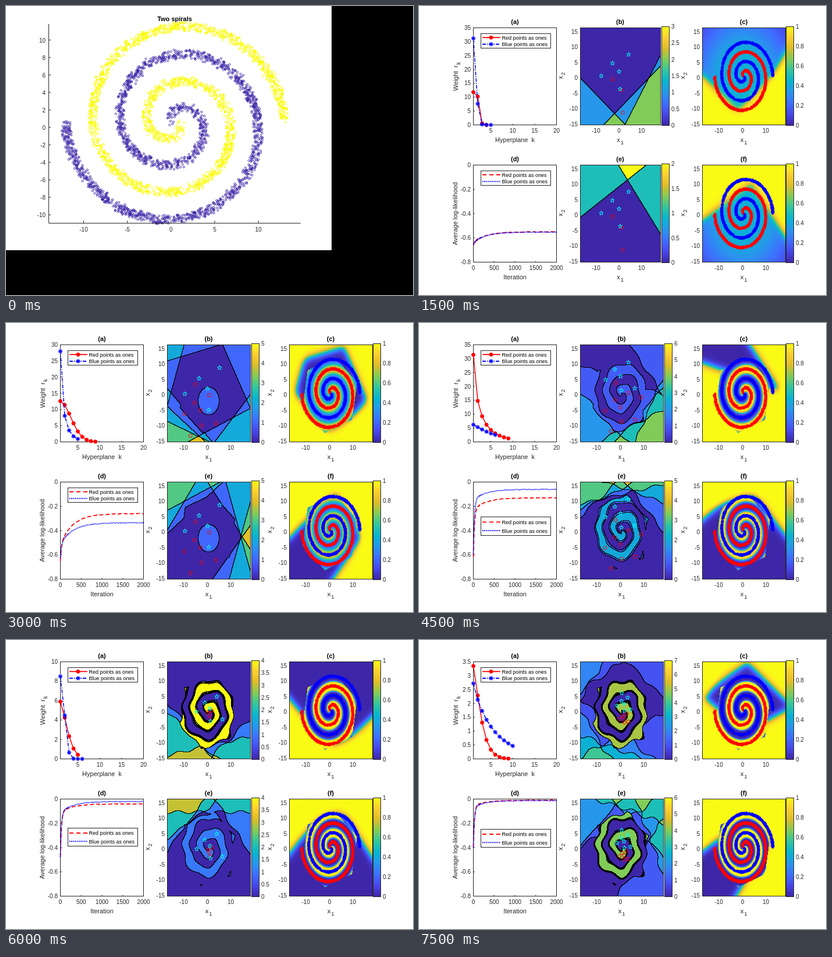
Animation, 700 px wide and 497 px high, one loop 8000 ms. Source, as an HTML page with a canvas:

```html
<!DOCTYPE html>
<html lang="en">
<head>
<meta charset="utf-8">
<title>Two spirals</title>
<style>
html, body { margin: 0; width: 100%; height: 100%; overflow: hidden; background: #fff; }
canvas { display: block; }
</style>
</head>
<body>
<canvas id="stage" width="700" height="497"></canvas>
<script>
const ctx = document.getElementById('stage').getContext('2d');
const FONT = '"Liberation Sans", Arial, sans-serif';
const INK = '#262626', RED = '#f00', BLUE = '#00f';
const W = 143, H = 167;

// Map between data units and panel pixels
const px = x => 69.5 + 4 * x, py = y => 85.5 - 5.3 * y;
const dataX = i => (i - 69.5) / 4, dataY = j => (85.5 - j) / 5.3;
const radians = degrees => degrees * Math.PI / 180;

const STOPS = ['3e26a8', '4747eb', '3e6fff', '2797eb', '08b5d0', '31c69f', '81cc59', 'dcbd29', 'fccf30', 'f9fb15']
  .map(hex => [0, 2, 4].map(i => parseInt(hex.slice(i, i + 2), 16)));
function rgb(v) {
  const p = Math.max(0, Math.min(1, v)) * 9, i = Math.min(8, Math.floor(p));
  return STOPS[i].map((c, k) => Math.round(c + (STOPS[i + 1][k] - c) * (p - i)));
}

function seeded(seed) {
  return () => (seed = (seed * 16807) % 2147483647) / 2147483647;
}

function text(s, x, y, { size = 10, align = 'center', bold = false, fill = INK } = {}) {
  ctx.font = `${bold ? 'bold ' : ''}${size}px ${FONT}`;
  ctx.textAlign = align;
  ctx.fillStyle = fill;
  ctx.fillText(s, x, y);
}
const title = (s, x, y) => text(s, x, y, { size: 11, bold: true, fill: '#000' });

// Axis label with an optional subscript; vertical ones read upwards
function label(s, sub, x, y, vertical) {
  ctx.save();
  ctx.translate(x, y);
  if (vertical) ctx.rotate(-Math.PI / 2);
  text(s, sub ? -3 : 0, 0, { size: 11 });
  const half = ctx.measureText(s).width / 2;
  if (sub) text(sub, half - 2, 4, { size: 9.5, align: 'left' });
  ctx.restore();
}

function line(points, stroke, width = 1, dash = []) {
  ctx.save();
  ctx.beginPath();
  points.forEach(([x, y]) => ctx.lineTo(x, y));
  ctx.strokeStyle = stroke;
  ctx.lineWidth = width;
  ctx.setLineDash(dash);
  ctx.stroke();
  ctx.restore();
}

function box(x, y, w, h, fill) {
  if (fill) { ctx.fillStyle = fill; ctx.fillRect(x, y, w, h); }
  ctx.strokeStyle = INK;
  ctx.lineWidth = 1;
  ctx.strokeRect(x, y, w, h);
}

function ring(x, y, r, stroke, width = 1, fill = 'transparent') {
  ctx.beginPath();
  ctx.arc(x, y, r, 0, 7);
  ctx.fillStyle = fill;
  ctx.fill();
  ctx.strokeStyle = stroke;
  ctx.lineWidth = width;
  ctx.stroke();
}

function asterisk(x, y, r, stroke, width = 1) {
  for (let a = 0; a < 180; a += 45) {
    const dx = r * Math.cos(radians(a)), dy = r * Math.sin(radians(a));
    line([[x - dx, y - dy], [x + dx, y + dy]], stroke, width);
  }
}

function star(x, y) {
  const points = Array.from({ length: 12 }, (_, i) => {
    const r = i % 2 ? 1.6 : 3.8, a = radians(36 * i);
    return [x + r * Math.sin(a), y - r * Math.cos(a)];
  });
  line(points, '#0ff');
}

// One arm of the data set; sign -1 gives the arm turned by half a circle
function spiralPoints(sign, count, noise, seed, draw) {
  const rand = seeded(seed), jitter = () => 0.5 + (rand() - 0.5) * noise;
  for (let i = 0; i < count; i++) {
    const n = Math.sqrt(rand()) * 4 * Math.PI;
    draw(sign * n * Math.cos(n) + jitter(), -sign * n * Math.sin(n) + jitter());
  }
}

function drawIntro() {
  ctx.fillStyle = '#000';
  ctx.fillRect(0, 0, 700, 497);
  ctx.fillStyle = '#fff';
  ctx.fillRect(0, 0, 560, 420);
  const ax = x => 283.8 + 15.03 * x, ay = y => 208.8 - 15.03 * y;
  spiralPoints(-1, 1900, 1, 77, (x, y) => ring(ax(x), ay(y), 1.6, '#3e26a8', 0.9));
  spiralPoints(1, 1900, 1, 4242, (x, y) => ring(ax(x), ay(y), 1.6, '#fbfb08', 0.9));
  line([[73.5, 31], [73.5, 373.5], [506.5, 373.5]], INK);
  for (let x = -10; x <= 10; x += 5) {
    line([[ax(x), 373], [ax(x), 369]], INK);
    text(x, ax(x), 388);
  }
  for (let y = -10; y <= 10; y += 2) {
    line([[73, ay(y)], [77, ay(y)]], INK);
    text(y, 68, ay(y) + 4, { align: 'right' });
  }
  title('Two spirals', 290, 26);
}

// Signed distances to the hyperplanes, each given as [normal angle, offset]
const distances = (planes, x, y) =>
  planes.map(([a, d]) => x * Math.cos(radians(a)) + y * Math.sin(radians(a)) - d);

const insideHexagon = (x, y) =>
  [-10, 50, 110].every(a => Math.abs(x * Math.cos(radians(a)) + y * Math.sin(radians(a))) < 10.8);

// Soft membership of the arm with the given sign
function armField(sign, gain, x, y) {
  x -= 0.5; y -= 0.5;
  return 1 / (1 + Math.exp(-sign * gain * Math.cos(Math.atan2(y, x) + Math.hypot(x, y))));
}

function probability({ planes, sign }, { gain }, x, y) {
  if (gain && insideHexagon(x, y)) return armField(sign, gain, x, y);
  const base = gain ? 0 : 0.42 - 0.02 * Math.max(0, Math.hypot(x, y) - 9);
  const activity = distances(planes, x, y).reduce((sum, d) => sum + Math.log1p(Math.exp(1.5 * d + 1)), 0);
  return 1 - (1 - base) * Math.exp(-activity);
}

// How many hyperplanes are active at a point
function activeCount({ planes, sign, arm, top }, { gain, warp = 0 }, x, y) {
  const u = x + warp * Math.sin(0.9 * y), v = y + warp * Math.sin(0.7 * x + 1);
  if (gain && insideHexagon(u, v))
    return arm ? Math.round(arm * armField(sign, gain, u, v)) : +(Math.hypot(x - 0.5, y + 2) < 4.5);
  return Math.min(top, distances(planes, u, v).filter(d => d > 0).length);
}

function raster(pixel) {
  const c = document.createElement('canvas');
  c.width = W; c.height = H;
  const g = c.getContext('2d'), img = g.createImageData(W, H);
  for (let j = 0, k = 0; j < H; j++)
    for (let i = 0; i < W; i++, k += 4) img.data.set([...pixel(i, j), 255], k);
  g.putImageData(img, 0, 0);
  return c;
}

function countMap(model, scene) {
  const levels = Array.from({ length: H + 1 }, (_, j) =>
    Array.from({ length: W + 1 }, (_, i) => activeCount(model, scene, dataX(i), dataY(j))));
  return raster((i, j) => {
    const v = levels[j][i];
    const edge = [levels[j][i + 1], levels[j + 1][i], levels[j + 1][i + 1]].some(n => n !== v);
    return edge ? [0, 0, 0] : rgb(v / model.top);
  });
}

const probabilityMap = (model, scene) =>
  raster((i, j) => rgb(probability(model, scene, dataX(i), dataY(j))));

// Markers spread around a centre by the golden angle
function scatter([count, cx, cy, spread], draw) {
  for (let i = 0; i < count; i++) {
    const r = spread * Math.sqrt(i / count), a = 2.4 * i;
    draw(px(cx + r * Math.cos(a)), py(cy + r * Math.sin(a)));
  }
}

function drawArms() {
  spiralPoints(-1, 900, 0.5, 31, (x, y) => asterisk(px(x), py(y), 2.2, RED));
  spiralPoints(1, 900, 0.5, 57, (x, y) => asterisk(px(x), py(y), 2.2, BLUE));
}

function colourBar(x, top, bottom, max) {
  const g = ctx.createLinearGradient(0, bottom, 0, top);
  STOPS.forEach((c, i) => g.addColorStop(i / 9, `rgb(${c})`));
  box(x + 0.5, top + 0.5, 13, bottom - top, g);
  const step = max > 4 ? 1 : max > 1 ? 0.5 : 0.2;
  for (let i = 0; i <= Math.round(max / step); i++)
    text(+(i * step).toFixed(1), x + 17, bottom - (bottom - top) * i * step / max + 4, { align: 'left' });
}

function mapPanel(name, x, y, w, image, overlay, barX, max) {
  ctx.save();
  ctx.beginPath();
  ctx.rect(x, y, w, H);
  ctx.clip();
  ctx.translate(x, y);
  ctx.scale(w / W, 1);
  ctx.drawImage(image, 0, 0);
  overlay();
  ctx.restore();
  box(x + 0.5, y - 0.5, w, H);
  for (const v of [-10, 0, 10]) text(v, x + px(v) * w / W - (v < 0 ? 1 : 0), y + 180);
  for (let v = -15; v <= 15; v += 5) text(v, x - 4, y + py(v) + 3.5, { align: 'right' });
  title(`(${name})`, x + w / 2, y - 7);
  label('x', '1', x + w / 2, y + 196);
  label('x', '2', x - 30, y + 82, true);
  colourBar(barX, y - 3, y + H, max);
}

// Axes of a curve panel; returns the two scales
function curveAxes(name, y, xs, ys) {
  const toX = v => 93.5 + W * (v - xs.from) / (xs.to - xs.from);
  const toY = v => y + H - H * (v - ys.from) / (ys.to - ys.from);
  box(93.5, y, W, H);
  for (let v = xs.first; v <= xs.to; v += xs.step) {
    line([[toX(v), y + H], [toX(v), y + H - 2]], INK);
    text(v, toX(v), y + H + 13.5);
  }
  for (let i = 0; i <= Math.round((ys.to - ys.from) / ys.step); i++) {
    const v = +(ys.from + i * ys.step).toFixed(1);
    line([[93, toY(v)], [96, toY(v)]], INK);
    text(v, 89, toY(v) + 3.5, { align: 'right' });
  }
  title(`(${name})`, 165, y - 6.5);
  label(xs.name, '', 165, y + 196.5);
  return [toX, toY];
}

function legend(y, h, dashes, marks) {
  box(106.5, y + 0.5, 120, h, '#fff');
  [['Red', RED], ['Blue', BLUE]].forEach(([name, c], i) => {
    const ly = y + h * (i ? 0.75 : 0.29);
    line([[109, ly], [140, ly]], c, 1.8, dashes[i]);
    if (marks) marks[i](124, ly);
    text(`${name} points as ones`, 142.5, ly + 3.5, { size: 9, align: 'left', fill: '#000' });
  });
}

function weightPanel({ max, red, blue }) {
  const step = max > 10 ? 5 : max > 5 ? 2 : 0.5;
  const [toX, toY] = curveAxes('a', 37.5,
    { name: 'Hyperplane  k', from: 1, to: 20, first: 5, step: 5 }, { from: 0, to: max, step });
  const dashes = [[], [6, 2, 1.5, 2]];
  const marks = [(x, y) => ring(x, y, 3, RED, 1, RED), (x, y) => asterisk(x, y, 3.7, BLUE, 1.4)];
  [red, blue].forEach(({ weights: [start, scale, power, count] }, i) => {
    const points = Array.from({ length: count }, (_, k) =>
      [toX(k + 1), toY(start * Math.exp(-((k / scale) ** power)))]);
    line(points, i ? BLUE : RED, 1.5, dashes[i]);
    points.forEach(p => marks[i](...p));
  });
  legend(47, 25, dashes, marks);
  label('Weight  r', 'k', 67, 121, true);
}

function likelihoodPanel({ red, blue, legendAt }) {
  const [toX, toY] = curveAxes('d', 273.5,
    { name: 'Iteration', from: 0, to: 2000, first: 0, step: 500 }, { from: -0.8, to: 0, step: 0.2 });
  // Fast and slow exponential approach to the final value
  [red, blue].forEach(({ fit: [start, end, slow] }, i) => {
    const points = [], rand = seeded(91 + i);
    for (let t = 0; t <= 2000; t += t < 200 ? 4 : 20) {
      const gap = (1 - slow) * Math.exp(-t / 25) + slow * Math.exp(-t / 300);
      points.push([toX(t), toY(end + (start - end) * gap) + rand() - 0.5]);
    }
    line(points, i ? BLUE : RED, 1.7, i ? [1.7, 1.2] : [7, 4]);
  });
  legend(...legendAt, [[7, 5], [1.7, 1.5]]);
  label('Average log-likelihood', '', 66, 357, true);
}

function drawScene(scene) {
  ctx.fillStyle = '#fff';
  ctx.fillRect(0, 0, 700, 497);
  weightPanel(scene);
  likelihoodPanel(scene);
  const w = scene.width || W;
  const marks = () => {
    scatter(scene.red.marks, (x, y) => ring(x, y, 3, RED));
    scatter(scene.blue.marks, star);
  };
  [['b', 'c', 38, { ...scene.red, sign: -1 }], ['e', 'f', 274, { ...scene.blue, sign: 1 }]]
    .forEach(([left, right, y, model]) => {
      mapPanel(left, 277, y, w, countMap(model, scene), marks, 279 + w, model.top);
      mapPanel(right, 487, y, W, probabilityMap(model, scene), drawArms, 631, 1);
    });
}

// weights: start, scale, power, count; fit: start, end, slow share;
// top: highest level; arm: level on the own arm; marks: count, centre, spread
const scenes = [{
  max: 35, gain: 0, width: 138, legendAt: [283, 25],
  red: { weights: [11.8, 1.55, 4.4, 4], fit: [-0.66, -0.55, 0.8], top: 3, marks: [3, 1, -4, 9],
    planes: [[233, 10.5], [-53, 8], [-35, 10.9]] },
  blue: { weights: [31.2, 0.83, 1.84, 5], fit: [-0.66, -0.552, 0.8], top: 2, marks: [5, 0, 2, 9],
    planes: [[120, 8], [40, 10.2]] }
}, {
  max: 30, gain: 1.6, legendAt: [283, 25],
  red: { weights: [12.6, 3.4, 1.9, 9], fit: [-0.65, -0.26, 0.65], top: 5, marks: [8, -3, -5, 10],
    planes: [[103, 14.6], [30, 13.8], [160, 15], [228, 10], [-68, 11], [-45, 13], [235, 13], [250, 14]] },
  blue: { weights: [28, 0.74, 0.73, 5], fit: [-0.63, -0.335, 0.6], top: 5, marks: [5, 0, 2, 11],
    planes: [[125, 9.5], [112, 13], [142, 14], [40, 10.5], [20, 13], [-43, 12], [-20, 14]] }
}, {
  max: 35, gain: 4, warp: 0.4, legendAt: [333, 32],
  red: { weights: [31.4, 1.5, 0.7, 9], fit: [-0.62, -0.13, 0.2], top: 6, arm: 1, marks: [9, 0, -4, 10],
    planes: [[255, -4.9], [41, 13.7], [232, 10], [-70, 11], [-50, 10], [-30, 13]] },
  blue: { weights: [6.2, 5.5, 1.1, 6], fit: [-0.6, -0.06, 0.16], top: 5, arm: 2, marks: [6, 0, 6, 8],
    planes: [[110, 13], [125, 14], [100, 12], [45, 13], [75, 14]] }
}, {
  max: 10, gain: 6, warp: 0.5, legendAt: [323, 31],
  red: { weights: [5.9, 2.1, 1.5, 5], fit: [-0.48, -0.04, 0.15], top: 4, arm: 4, marks: [4, 0.8, -1, 2],
    planes: [[227, 9.4], [-54, 12.7], [235, 10], [-80, 11]] },
  blue: { weights: [8.5, 1.25, 2, 6], fit: [-0.48, -0.02, 0.2], top: 4, arm: 1, marks: [6, 1, 1, 7],
    planes: [[120, 11.5], [40, 12.9], [90, 12], [135, 12]] }
}, {
  max: 3.5, gain: 8, warp: 0.7, legendAt: [325, 31],
  red: { weights: [3.35, 2.1, 1.3, 9], fit: [-0.4, -0.01, 0.12], top: 7, arm: 5, marks: [6, 1.5, -2, 2.5],
    planes: [[118, 14], [53, 14.8], [238, 5.5], [-68, 7.1], [220, 13], [255, 12], [140, 16]] },
  blue: { weights: [2.72, 4.8, 0.9, 10], fit: [-0.4, -0.012, 0.14], top: 6, arm: 4, marks: [7, 1.5, 2.5, 4],
    planes: [[115, 8], [50, 10], [-39, 8], [130, 12], [75, 13], [25, 13]] }
}];

const LOOP = 8000, HOLD = 1500;
let start, shown = -1;
function tick(now) {
  start ??= now;
  const slide = Math.floor((now - start) % LOOP / HOLD);
  if (slide !== shown) {
    shown = slide;
    slide ? drawScene(scenes[slide - 1]) : drawIntro();
  }
  requestAnimationFrame(tick);
}
requestAnimationFrame(tick);
</script>
</body>
</html>
```
